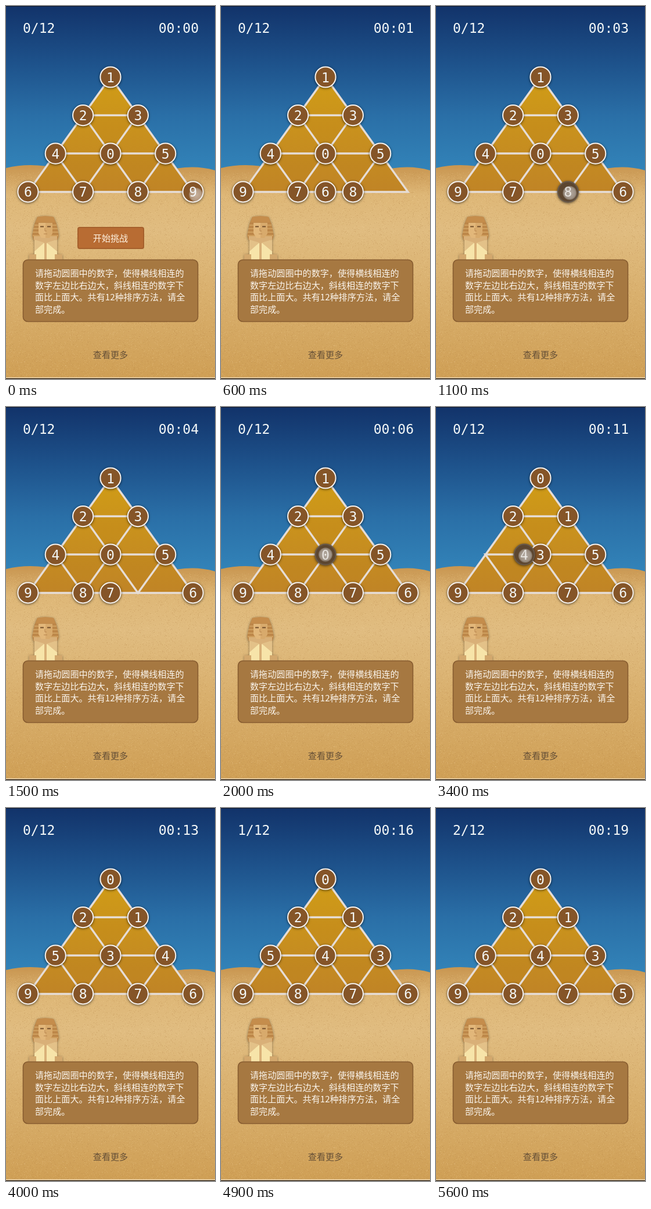
An HTML page for the animation above (5.7 s loop, 360 by 640 pixels).

```html
<!DOCTYPE html>
<html lang="zh-CN">
<head>
<meta charset="utf-8">
<title>数字金字塔</title>
<style>
  html, body { margin: 0; width: 100%; height: 100%; overflow: hidden; background: #cf9f55; }
  svg { display: block; width: 360px; height: 640px; font: 15.1px "Noto Sans CJK SC", "Noto Sans CJK", sans-serif; }
  .mono { font: 23px "DejaVu Sans Mono", monospace; fill: #f4f8f8; }
  .mid { text-anchor: middle; }
  .node circle { fill: #855528; stroke: #f8f4f0; stroke-width: 2; filter: drop-shadow(0 1px 2px #0009); }
  .node.held circle { fill: #5c4630; stroke: #68594a; }
  .node.held text { fill: #d8d2ca; }
</style>
</head>
<body>
<svg viewBox="0 0 360 640">
  <defs>
    <linearGradient id="sky" x2="0" y2="1">
      <stop stop-color="#12336a"/><stop offset=".35" stop-color="#1e538c"/>
      <stop offset=".65" stop-color="#2a6fa7"/><stop offset="1" stop-color="#3385ba"/>
    </linearGradient>
    <linearGradient id="sand" x2="0" y2="1">
      <stop stop-color="#c8954f"/><stop offset=".14" stop-color="#deb777"/>
      <stop offset=".3" stop-color="#e0bc80"/><stop offset="1" stop-color="#cf9f55"/>
    </linearGradient>
    <linearGradient id="gold" x2="0" y2="1">
      <stop stop-color="#d09c16"/><stop offset="1" stop-color="#c08426"/>
    </linearGradient>
    <radialGradient id="glow">
      <stop stop-color="#fff" stop-opacity=".55"/><stop offset=".8" stop-color="#eee" stop-opacity=".45"/>
      <stop offset="1" stop-color="#ddd" stop-opacity=".25"/>
    </radialGradient>
  </defs>

  <rect width="360" height="290" fill="url(#sky)"/>
  <path d="M0 278Q45 267 95 280Q180 298 268 284Q320 270 360 282V640H0Z" fill="url(#sand)"/>
  <path id="dark" stroke="#a8743a" stroke-opacity=".25"/>
  <path id="light" stroke="#f4d8a4" stroke-opacity=".24"/>
  <path d="M0 .5H360M0 639.5H360" stroke="#10182c"/>
  <path d="M0 637.5H360" stroke="#e6d9c2"/>

  <path d="M180 122L38 319H322Z" fill="url(#gold)"/>
  <path d="M133 187.5H227L180 253ZM85 253H180L133 319ZM180 253H275L227 319Z" fill="#a87010" opacity=".12"/>
  <path d="M180 122L38 319H322ZM133 187.5H227L132.7 319L85 253H275L227.3 319Z" fill="none" stroke="#e6ddd6" stroke-width="3.4"/>

  <!-- stone figure -->
  <g style="filter:drop-shadow(0 1px 2px #0006)">
    <path d="M49 395H88V435H49Z" fill="#f7e4a9"/>
    <path d="M54 362Q68 359 82 362L87 374L91 394L88 402H48L45 394L49 374Z" fill="#bd8749"/>
    <path d="M49 376H87M47 382H89M46 388H90M46 394H90" stroke="#d0a05f" stroke-width="2"/>
    <path d="M54 362Q68 359 82 362L85 371H51Z" fill="#c58d4c"/>
    <path d="M48 395H88V401L70 407V435H66V407L48 401Z" fill="#d9b078"/>
    <path d="M49 401L66 406L49 421ZM88 401L70 406L88 421Z" fill="#e3c188"/>
    <path d="M56 372H80V390L75 398H61L56 390Z" fill="#e2b77a"/>
    <path d="M68 372H80V390L75 398H68Z" fill="#d8aa6c"/>
    <path d="M59 378.5H65M71 378.5H77" stroke="#75502c" stroke-width="2"/>
    <path d="M65 391H71M67 381V386H70" fill="none" stroke="#b5834c"/>
    <path d="M40 426H52V435H40ZM84 426H97V435H84Z" fill="#d3a86d"/>
  </g>

  <rect x="29.5" y="435.5" width="301" height="106" rx="8" fill="#a67841" stroke="#875c30" stroke-width="1.6"/>
  <g fill="#fbf5ec">
    <text x="50" y="464">请拖动圆圈中的数字，使得横线相连的</text>
    <text x="50" y="484.5">数字左边比右边大，斜线相连的数字下</text>
    <text x="50" y="505">面比上面大。共有12种排序方法，请全</text>
    <text x="50" y="525.5">部完成。</text>
  </g>
  <text class="mid" x="180" y="603.5" fill="#665037">查看更多</text>

  <g id="button">
    <rect x="124" y="380" width="113" height="36" rx="3" fill="#b86c33" stroke="#a5602c" stroke-width="2"/>
    <text class="mid" x="180" y="403.5" fill="#fff3e2">开始挑战</text>
  </g>

  <text id="score" class="mono" x="29" y="46"></text>
  <text id="clock" class="mono" x="332" y="46" text-anchor="end"></text>
  <g id="board"></g>
  <circle id="touch" r="12" fill="url(#glow)"/>
</svg>
<script>
const LOOP = 5700, STEP = 100;
const $ = id => document.getElementById(id);
const clamp = v => Math.max(0, Math.min(1, v));
const ease = p => p * p * (3 - 2 * p);

// Sand grain
let seed = 7;
const random = () => (seed = seed * 16807 % 2147483647) / 2147483647;
for (const id of ["dark", "light"]) {
  let d = "";
  for (let i = 0; i < 6000; i++) d += `M${random() * 360 | 0} ${(285 + random() * 352 | 0) + .5}h1`;
  $(id).setAttribute("d", d);
}

const spots = [];
for (let row = 0; row < 4; row++)
  for (let i = 0; i <= row; i++) spots.push([180 + (i - row / 2) * 94.7, 122 + row * 65.6]);

const START = [1, 2, 3, 4, 0, 5, 6, 7, 8, 9];
// digit, target spot, press, drag start, drop, finger offset x and y, sideways bow
const MOVES = [
  [9, 6, 0, 100, 600, 5, 5, 0],
  [8, 7, 1000, 1100, 1500, 3, 2, 0],
  [0, 0, 1900, 2000, 2350, 0, 0, 0],
  [1, 2, 2450, 2550, 2850, 1, -4, 5],
  [4, 5, 3100, 3200, 3700, 2, 2, 0],
  [3, 5, 4150, 4250, 4600, 2, 2, 0],
  [5, 9, 4950, 5050, 5450, 2, 2, 0]
];

const nodes = START.map((_, digit) => {
  const g = document.createElementNS("http://www.w3.org/2000/svg", "g");
  g.innerHTML = `<circle r="17.6"/><text class="mono mid" y="8.5">${digit}</text>`;
  $("board").append(g);
  return g;
});

function between(a, b, p, bow = 0) {
  const dx = b[0] - a[0], dy = b[1] - a[1];
  const side = bow * Math.sin(Math.PI * p) / (Math.hypot(dx, dy) || 1);
  return [a[0] + dx * p - dy * side, a[1] + dy * p + dx * side];
}

const place = (el, [x, y]) => el.setAttribute("transform", `translate(${x} ${y})`);

function render(t) {
  const order = [...START], moved = {};
  let held = -1, finger = null;
  for (const [digit, target, press, start, drop, fx, fy, bow] of MOVES) {
    if (t < press) break;
    const from = order.indexOf(digit), other = order[target];
    if (t >= drop) {
      order[from] = other;
      order[target] = digit;
      delete moved[digit];
      moved[other] = between(spots[target], spots[from], clamp((t - drop + 100) / 200));
    } else {
      const p = ease(clamp((t - start) / (drop - start)));
      const at = moved[digit] = between(spots[from], spots[target], p, bow);
      finger = [at[0] + fx, at[1] + fy];
      if (t > press) held = digit;
    }
  }
  order.forEach((digit, i) => {
    place(nodes[digit], moved[digit] || spots[i]);
    nodes[digit].setAttribute("class", digit === held ? "node held" : "node");
  });
  if (held >= 0) $("board").append(nodes[held]);
  $("touch").style.display = finger ? "" : "none";
  if (finger) place($("touch"), finger);

  $("button").style.display = t < 100 ? "" : "none";
  $("score").textContent = (t >= 5450 ? 2 : t >= 4600 ? 1 : 0) + "/12";
  const seconds = Math.max(0, Math.floor(t * .0035 - .55));
  $("clock").textContent = "00:" + String(seconds).padStart(2, "0");
}

const began = performance.now();
let last = -1;
function tick() {
  const t = Math.floor((performance.now() - began) % LOOP / STEP) * STEP;
  if (t !== last) render(last = t);
  requestAnimationFrame(tick);
}
tick();
</script>
</body>
</html>
```
